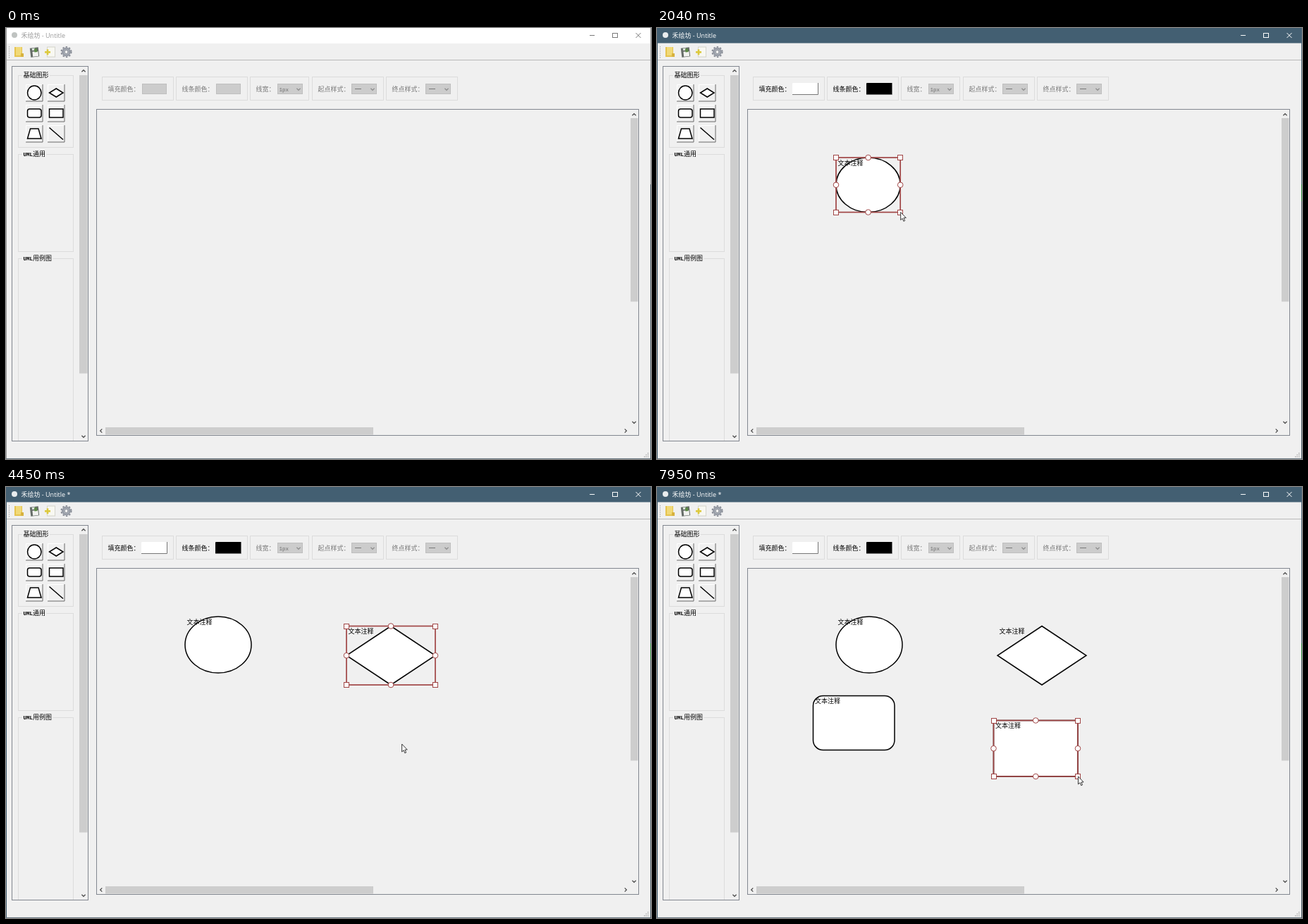
Write an HTML page with a canvas that moves like this. It is 915 px wide and 612 px high and loops after 8000 ms.

```html
<!DOCTYPE html>
<html lang="zh-CN">
<head>
<meta charset="utf-8">
<title>Diagram editor</title>
<style>
html, body { margin: 0; width: 100%; height: 100%; overflow: hidden; background: #f0f0f0; }
canvas { display: block; }
</style>
</head>
<body>
<canvas id="stage" width="915" height="612"></canvas>
<script>
const ctx = document.getElementById('stage').getContext('2d');
const LOOP = 8000, FOCUS = 100, EDITED = 2270;
const CJK = '9px "Noto Sans CJK SC", "Noto Sans CJK", sans-serif';
const MONO = '7.5px "Liberation Mono", monospace';
const TITLE = '9px "Open Sans", "Noto Sans CJK SC", sans-serif';
const GREY = '#787878', PEN = 1.5;

// Each shape: pick its button, drag between two corners, click away to deselect
const shapes = [
  { kind: 'ellipse', from: [254, 184], to: [348, 264], away: [359, 378], reach: 840, start: 1790, end: 2070, blur: 2500, sunken: true },
  { kind: 'diamond', from: [483, 197.5], to: [609, 281], away: [560, 367], reach: 3020, start: 3480, end: 4130, blur: 4560 },
  { kind: 'round', from: [221.5, 296.5], to: [337, 373.5], away: [348, 374], reach: 5120, start: 5590, end: 6220, blur: 6450 },
  { kind: 'rect', from: [477.5, 331.5], to: [597, 411], away: [597, 411], reach: 7030, start: 7490, end: 7950, blur: LOOP, sunken: true }
];

const glide = u => 1 - (1 - u) ** 4;
const drag = u => u * u * (3 - 2 * u);
const within = (t, a, b) => t >= a && t < b;
const leaveTime = s => s.start - 290;
const buttonAt = i => [28 + i % 2 * 31, 80 + (i >> 1) * 29];

const path = [{ t: FOCUS, at: [560, 420] }];
shapes.forEach((s, i) => {
  const [x, y] = buttonAt(i), button = [x + 11, y + 11];
  const go = (t, at, ease = glide) => path.push({ t, at, ease });
  go(s.reach, button);
  go(leaveTime(s), button);
  go(s.start - 90, s.from);
  go(s.start, s.from);
  go(s.end, s.to, drag);
  go(s.end + 150, s.to);
  go(s.blur, s.away);
});

function pointerAt(t) {
  const i = Math.max(1, path.findIndex(p => p.t > t)), a = path[i - 1], b = path[i];
  const k = b.ease(Math.max(0, (t - a.t) / (b.t - a.t)));
  return a.at.map((v, axis) => v + (b.at[axis] - v) * k);
}

function fill(color, x, y, w, h) {
  ctx.fillStyle = color;
  ctx.fillRect(x, y, w, h);
}

function frame(color, x, y, w, h) {
  ctx.strokeStyle = color;
  ctx.lineWidth = 1;
  ctx.strokeRect(x + .5, y + .5, w, h);
}

function finish(stroke, width, paint) {
  if (paint) { ctx.fillStyle = paint; ctx.fill(); }
  if (stroke) { ctx.strokeStyle = stroke; ctx.lineWidth = width; ctx.stroke(); }
}

function poly(points, stroke, width = 1, paint) {
  ctx.beginPath();
  for (let i = 0; i < points.length; i += 2) ctx.lineTo(points[i], points[i + 1]);
  if (paint) ctx.closePath();
  finish(stroke, width, paint);
}

function circle(x, y, r, stroke, width, paint) {
  ctx.beginPath();
  ctx.arc(x, y, r, 0, 2 * Math.PI);
  finish(stroke, width, paint);
}

function text(s, x, y, color = '#000', font = CJK) {
  ctx.font = font;
  ctx.fillStyle = color;
  ctx.fillText(s, x, y);
}

function outline(kind, x, y, w, h, radius) {
  const cx = x + w / 2, cy = y + h / 2;
  if (kind === 'diamond') return poly([cx, y, x + w, cy, cx, y + h, x, cy], '#000', PEN, '#fff');
  if (kind === 'trapezoid') return poly([x + 4, y, x + w - 4, y, x + w, y + h, x, y + h], '#000', PEN, '#fff');
  if (kind === 'line') return poly([x, y, x + w, y + h], '#000', PEN);
  ctx.beginPath();
  if (kind === 'ellipse') ctx.ellipse(cx, cy, w / 2, h / 2, 0, 0, 2 * Math.PI);
  else ctx.roundRect(x, y, w, h, kind === 'round' ? Math.min(radius, w / 2, h / 2) : 0);
  finish('#000', PEN, '#fff');
}

// Small arrow head; turn counts quarter turns from pointing down
function chevron(x, y, turn = 0, color = '#505050') {
  ctx.save();
  ctx.translate(x, y);
  ctx.rotate(turn * Math.PI / 2);
  poly([-2.6, -1.3, 0, 1.3, 2.6, -1.3], color, 1.3);
  ctx.restore();
}

function bevel(x, y, w, h, light, dark) {
  poly([x + .5, y + h, x + .5, y + .5, x + w, y + .5], light);
  poly([x, y + h - .5, x + w - .5, y + h - .5, x + w - .5, y], dark);
}

function titleBar(t) {
  const active = t >= FOCUS, ink = active ? '#fff' : GREY;
  fill(active ? '#435f72' : '#fff', 0, 0, 915, active ? 21.5 : 22);
  circle(12, 10, 4, null, 0, active ? '#e9ecee' : '#bfc3c1');
  text('禾绘坊 - Untitle' + (t >= EDITED ? ' *' : ''), 21.5, 13.5, active ? '#fff' : '#999', TITLE);
  poly([828, 10.5, 835, 10.5], ink);
  frame(ink, 860, 7, 7, 6);
  poly([893.5, 7, 900.5, 14], ink);
  poly([900.5, 7, 893.5, 14], ink);
}

function toolBar() {
  fill('#b9b9b9', 0, 45, 915, 1);
  for (let y = 26; y < 43; y += 3) fill('#aaa', 4, y, 1, 1.5);
  // Open
  fill('#e5c34f', 12, 27, 11, 14);
  fill('#f1d978', 14, 27, 8, 12);
  fill('#d7b23f', 21, 36, 4, 5);
  // Save
  ctx.save();
  ctx.translate(40.5, 34.5);
  ctx.rotate(-.12);
  fill('#666c68', -6, -6.5, 12, 13);
  fill('#f2f2f0', -3, -1, 8, 7);
  fill('#dfe5df', -3, -6, 4, 3);
  fill('#5c8a45', 0, -5, 4, 5);
  ctx.restore();
  // New
  fill('#d5d5cc', 58, 26.5, 12, 15);
  fill('#f8f8f2', 59, 27.5, 10, 13);
  fill('#dcc93d', 55, 33, 8, 2.6);
  fill('#dcc93d', 57.7, 30.3, 2.6, 8);
  // Settings
  circle(85.5, 34, 5, '#979ca6', 3, '#c9ced6');
  ctx.setLineDash([2.4, 2.3]);
  circle(85.5, 34, 7.2, '#80858f', 1.6);
  ctx.setLineDash([]);
  circle(85.5, 34, 2.6, '#777d87', 1, '#f0f0f0');
}

function group(latin, label, y, h) {
  const latinWidth = latin.length * 4.5;
  frame('#dcdcdc', 17, y, 78, h);
  fill('#f0f0f0', 23, y - 1, latinWidth + label.length * 9 + 3, 3);
  text(latin, 24.5, y + 3, '#000', 'bold ' + MONO);
  text(label, 24.5 + latinWidth, y + 3);
}

function palette(t) {
  ctx.save();
  ctx.beginPath();
  ctx.rect(8, 54, 109, 533);
  ctx.clip();
  group('', '基础图形', 67, 102);
  group('UML', '通用', 179, 138);
  group('UML', '用例图', 327, 300);
  frame('#828790', 8, 54, 108, 532);
  ctx.restore();

  ['ellipse', 'diamond', 'round', 'rect', 'trapezoid', 'line'].forEach((kind, i) => {
    const [x, y] = buttonAt(i), s = shapes[i];
    const pressed = s && s.sunken && within(t, s.reach + 60, leaveTime(s));
    const h = kind === 'ellipse' ? 20 : kind === 'line' ? 17 : i > 3 ? 14 : 12;
    bevel(x, y, 24.5, 24.5, pressed ? '#696969' : '#fff', pressed ? '#fff' : '#696969');
    outline(kind, x + 2.5, y + 12 - h / 2, 19.5, h, 3);
  });

  chevron(110, 61, 2);
  chevron(110, 580);
  fill(within(t, 6660, 6900) ? '#a8a8a8' : '#cdcdcd', 104, 67, 11.5, 423.5);
}

function swatch(x, color, on) {
  fill(on ? color : '#ccc', x + 1, 79, 35, 15);
  if (on) bevel(x, 78, 37, 17, color, GREY);
  else frame('#bfbfbf', x + 1, 79, 34, 14);
}

function combo(x, value) {
  fill('#ccc', x, 79, 36, 15);
  frame('#bfbfbf', x, 79, 35, 14);
  chevron(x + 30, 87, 0, '#909090');
  if (value) text(value, x + 2.5, 89.5, '#6d6d6d', MONO);
  else fill(GREY, x + 5, 86, 9, 1);
}

function options(on) {
  let x = 136;
  for (const label of ['填充颜色：', '线条颜色：', '线宽：', '起点样式：', '终点样式：']) {
    const left = Math.floor(x), labelWidth = label.length * 9;
    const control = Math.floor(x + 11.3 + labelWidth), isColor = label.includes('颜色');
    frame('#dcdcdc', left, 69, labelWidth + 56, 33);
    text(label, left + 8.5, 90, isColor && on ? '#000' : GREY);
    if (isColor) swatch(control, label[0] === '填' ? '#fff' : '#000', on);
    else combo(control, label[0] === '线' ? '1px' : '');
    x += labelWidth + 60.4;
  }
}

function board() {
  frame('#828790', 128, 115, 769, 463);
  fill('#cdcdcd', 886, 128, 10.5, 260.5);
  fill('#cdcdcd', 141, 567, 380, 10.5);
  chevron(891, 123, 2);
  chevron(891, 560);
  chevron(135, 572, 1);
  chevron(879, 572, 3);
}

function handles(x, y, w, h) {
  const red = '#a04545';
  ctx.strokeStyle = red;
  ctx.lineWidth = 1.7;
  ctx.strokeRect(x, y, w, h);
  for (const k of [0, 1]) {
    circle(x + w / 2, y + h * k, 3.8, red, 1, '#fff');
    circle(x + w * k, y + h / 2, 3.8, red, 1, '#fff');
  }
  for (const ky of [0, 1]) for (const kx of [0, 1]) {
    const left = Math.round(x + w * kx - 4), top = Math.round(y + h * ky - 4);
    fill('#fff', left, top, 7, 7);
    frame(red, left, top, 7, 7);
  }
}

function drawShape(s, t) {
  if (t < s.start) return;
  const [x, y] = s.from, [px, py] = pointerAt(Math.min(t, s.end));
  const w = Math.max(1, px - x), h = Math.max(1, py - y);
  outline(s.kind, x, y, w, h, 14);
  if (t < s.blur) handles(x, y, w, h);
  if (w > 8) text('文本注释', x + 2.5, y + 10.5);
}

function pointer(x, y) {
  ctx.save();
  ctx.translate(x + .5, y);
  poly([0, 0, 0, 11, 2.5, 8.8, 4.2, 12.8, 6, 12, 4.3, 8.1, 7.6, 8], '#222', .9, '#fff');
  ctx.restore();
}

function windowEdge(t) {
  const active = t >= FOCUS;
  fill(active ? '#435f72' : '#9a9a9a', 0, 0, 1, 612);
  fill('#6c7a84', 0, 611, 915, 1);
  fill(active ? '#52697a' : '#a5a5a5', 914, 0, 1, 222);
  fill('#4d5c66', 914, 222, 1, 390);
  if (active) fill('#2f8a3c', 914, 222, 1, 24);
  for (let i = 0; i < 3; i++)
    for (let j = 0; j <= i; j++) fill('#b5b5b5', 910 - j * 2.5, 603 + i * 2.5, 1.5, 1.5);
}

function draw(t) {
  fill('#f0f0f0', 0, 0, 915, 612);
  titleBar(t);
  toolBar();
  palette(t);
  options(shapes.some(s => within(t, s.start, s.blur)));
  board();
  shapes.forEach(s => drawShape(s, t));
  windowEdge(t);
  if (t >= FOCUS) pointer(...pointerAt(t));
}

const begin = performance.now();
function tick() {
  draw((performance.now() - begin) % LOOP);
  requestAnimationFrame(tick);
}
tick();
</script>
</body>
</html>
```
